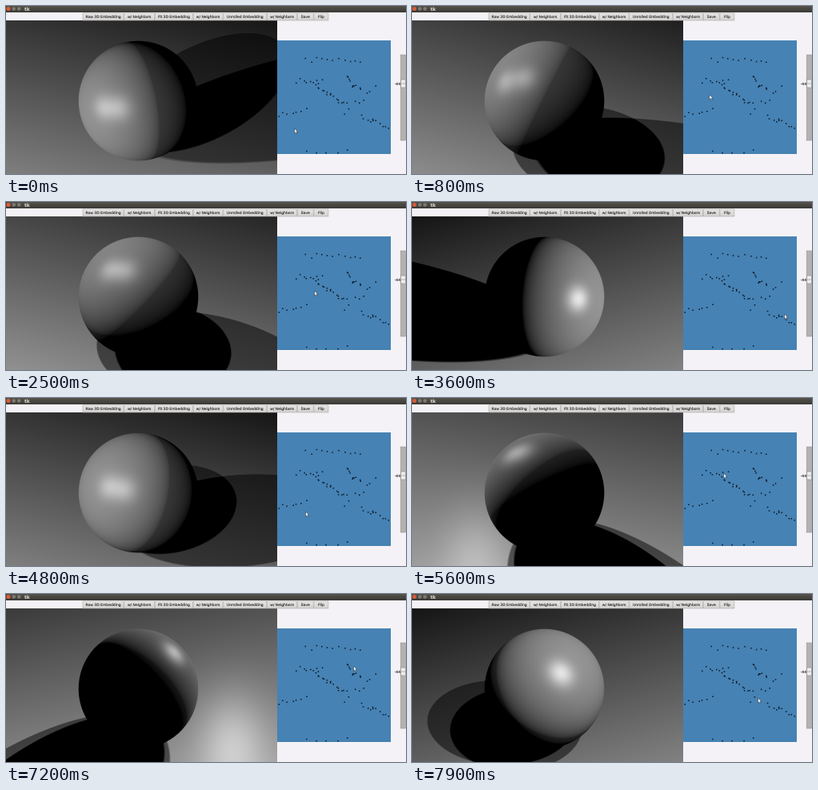
Animation of 500 by 210 pixels, one loop 8 s. Source, as an HTML page with a canvas:

```html
<!DOCTYPE html>
<html lang="en">
<head>
<meta charset="utf-8">
<title>tk</title>
<style>
  html, body { margin: 0; width: 100%; height: 100%; overflow: hidden; background: #f4f2f6; }
  #stage { position: absolute; left: 0; top: 0; width: 500px; height: 210px; overflow: hidden; }
  canvas { position: absolute; left: 0; top: 18px; }
  svg { position: absolute; left: 0; top: 0; font-family: "DejaVu Sans", sans-serif; }
</style>
</head>
<body>
<div id="stage">
  <canvas id="view" width="339" height="192"></canvas>
  <svg width="500" height="210" viewBox="0 0 500 210">
    <defs>
      <linearGradient id="bar" x2="0" y2="1"><stop stop-color="#55534c"/><stop offset="1" stop-color="#3a3934"/></linearGradient>
      <linearGradient id="btn" x2="0" y2="1"><stop stop-color="#e9e7e6"/><stop offset="1" stop-color="#d3d1d0"/></linearGradient>
    </defs>
    <rect width="500" height="8" fill="url(#bar)"/>
    <circle cx="3" cy="3.5" r="2.5" fill="#dd5a35"/>
    <circle cx="9.8" cy="3.5" r="2.3" fill="#7c7a72"/>
    <circle cx="16.2" cy="3.5" r="2.3" fill="#7c7a72"/>
    <text x="23" y="5.6" font-size="6" font-weight="bold" fill="#dfdbd2">tk</text>
    <g id="buttons"></g>
    <rect x="339" y="43" width="142" height="142" fill="#4682b4"/>
    <path id="dots" fill="#0a1520"/>
    <text x="493" y="99.4" font-size="4.5" text-anchor="end" fill="#222" stroke="#222" stroke-width=".12">-44</text>
    <rect x="493.2" y="61" width="6.3" height="107" fill="#b4b2b0" stroke="#96948f" stroke-width=".6"/>
    <rect x="493.6" y="92" width="5.8" height="10" fill="#efedec" stroke="#8a8884" stroke-width=".6"/>
    <path d="M493.8 97h5.4" stroke="#8a8884" stroke-width=".6"/>
    <path id="cursor" d="M0 0V6.2L1.4 4.9 2.4 7.2 3.4 6.8 2.4 4.6H4.3Z" fill="#fff" stroke="#16212c" stroke-width=".5"/>
  </svg>
</div>
<script>
const LOOP = 8000, STEP = 100;
const W = 339, H = 192, TOP = 18;
const CX = 165.5, CY = 118.5, R = 74.8;         // ball on screen
const FLOOR_Y = 168, TILT = .68, DEPTH = 1 / 500; // floor seen by the camera
const RISE = Math.sqrt(1 - TILT * TILT);
const MAP_X = 410, MAP_Y = 124;                 // pointer spot with the light overhead

const $ = id => document.getElementById(id);
const clamp = v => v < 0 ? 0 : v > 1 ? 1 : v;
const mix = (a, b, k) => a + (b - a) * k;
const rad = deg => deg * Math.PI / 180;

// pointer path: time, x, y
const path = [
  [0, 362, 156], [1500, 383, 78], [2800, 388, 122], [2900, 388, 122], [3600, 467, 143],
  [4800, 376, 145], [5600, 391, 97], [7200, 436, 93], [7900, 434, 133]
];

function pointerAt(t) {
  let i = 0;
  while (i < path.length - 2 && t >= path[i + 1][0]) i++;
  const [t0, x0, y0] = path[i], [t1, x1, y1] = path[i + 1];
  const k = clamp((t - t0) / (t1 - t0));
  const e = mix(k, k * k * (3 - 2 * k), .5);
  return [mix(x0, x1, e), mix(y0, y1, e)];
}

// Offset from the overhead spot -> direction and zenith angle of a light
function makeLight(dx, dy) {
  const len = Math.hypot(dx, dy) || 1;
  const ux = dx / len, uy = dy / len, back = Math.max(0, -uy);
  const zenith = 1.3 * Math.hypot(dx, dy < 0 ? dy * 1.8 : dy);
  const flat = Math.sin(rad(zenith)), up = Math.cos(rad(zenith));
  const x = flat * ux;
  const y = flat * uy * TILT - up * RISE;
  const z = flat * uy * RISE + up * TILT;
  const half = Math.hypot(x, y, z + 1) || 1;
  const cast = rad(Math.min(zenith, 80 - 24 * back));
  return {
    ux, uy, x, y, z,
    hx: x / half, hy: y / half, hz: (z + 1) / half,
    reach: R * Math.tan(cast), long: R / Math.cos(cast), wide: R * (1 + .1 * Math.tan(cast))
  };
}

function shadow(l, gx, gy) {
  const along = -gx * l.ux - gy * l.uy - l.reach;
  const across = gx * l.uy - gy * l.ux;
  return clamp(.5 + (1 - Math.hypot(along / l.long, across / l.wide)) * 55);
}

function shine(l, nx, ny, nz, body) {
  const d = nx * l.x + ny * l.y + nz * l.z;
  if (d <= 0) return 0;
  const s = Math.max(0, nx * l.hx + ny * l.hy + nz * l.hz);
  return body * Math.sqrt(d) + 95 * s ** 45 * Math.min(1, d * 6);
}

const ctx = $("view").getContext("2d");
const image = ctx.createImageData(W, H);

function render(t) {
  const [px, py] = pointerAt(t);
  $("cursor").setAttribute("transform", `translate(${px - 1.5} ${py - 3})`);
  const dx = px - MAP_X, dy = py - MAP_Y;
  const ux = dx / (Math.hypot(dx, dy) || 1);
  const back = Math.max(0, -dy) / (Math.hypot(dx, dy) || 1);

  // two lights that drift apart toward the left of the map
  const spread = .16 * Math.max(0, 467 - px) * (1 - .7 * back);
  const a = makeLight(dx - .84 * spread, dy - .54 * spread);
  const b = makeLight(dx + .84 * spread, dy + .54 * spread);

  const body = 148 - 35 * back;
  const glow = 140 * clamp((-dy - 20) / 26);
  const glowX = CX + 4.5 * dx, glowY = 290 + 3.3 * dy;
  const data = image.data;
  for (let j = 0, o = 0; j < H; j++) {
    const y = j + TOP + .5, drop = y - FLOOR_Y;
    const gy = drop / (TILT + DEPTH * drop), shrink = 1 - DEPTH * gy;
    const base = mix(38, 112, j / H) + 42 * back;
    for (let i = 0; i < W; i++, o += 4) {
      const x = i + .5;
      const nx = (x - CX) / R, ny = (y - CY) / R, r = Math.hypot(nx, ny);
      const cover = clamp((1 - r) * R + .5);
      let tone = 0;
      if (cover < 1) {
        const gx = (x - CX) * shrink;
        tone = base + 18 * ux * (x - CX) / CX;
        if (glow) tone += glow * Math.exp(-(((x - glowX) / 43) ** 2 + ((y - glowY) / 68) ** 2));
        tone *= 1 - (shadow(a, gx, gy) + shadow(b, gx, gy)) / 2;
      }
      if (cover > 0) {
        const nz = Math.sqrt(Math.max(0, 1 - r * r));
        const ball = (shine(a, nx, ny, nz, body) + shine(b, nx, ny, nz, body)) / 2;
        tone = mix(tone, ball, cover);
      }
      data[o] = data[o + 1] = data[o + 2] = tone;
      data[o + 3] = 255;
    }
  }
  ctx.putImageData(image, 0, 0);
}

function drawButtons() {
  const labels = ["Raw 3D Embedding", "w/ Neighbors", "Fit 3D Embedding", "w/ Neighbors",
    "Unrolled Embedding", "w/ Neighbors", "Save", "Flip"];
  const widths = [51, 38, 47, 37, 54, 37, 20, 18];
  let x = 96;
  $("buttons").innerHTML = labels.map((label, i) => {
    const w = widths[i], left = x;
    x += w + .7;
    return `<rect x="${left}" y="9" width="${w}" height="9" fill="url(#btn)" stroke="#aaa8a6" stroke-width=".6"/>
      <text x="${left + w / 2}" y="15" font-size="4.5" text-anchor="middle" fill="#1c1c1c" stroke="#1c1c1c" stroke-width=".1">${label}</text>`;
  }).join("");
}

// loose strands of dots: from x,y to x,y and how many
function drawDots() {
  let seed = 7;
  const random = () => (seed = seed * 16807 % 2147483647) / 2147483647;
  const strands = [
    [364, 92, 394, 95, 9], [386, 98, 424, 124, 16], [374, 66, 442, 68, 11], [424, 88, 442, 106, 10],
    [444, 135, 476, 154, 11], [341, 134, 375, 126, 7], [376, 183, 426, 183, 5], [424, 131, 460, 100, 8]
  ];
  let d = "";
  for (const [x0, y0, x1, y1, n] of strands)
    for (let i = 0; i < n; i++) {
      const k = i / (n - 1);
      const x = mix(x0, x1, k) + random() * 4 - 2, y = mix(y0, y1, k) + random() * 8 - 4;
      d += `M${Math.max(340, x).toFixed(1)} ${Math.min(183, y).toFixed(1)}h1.5v1.5h-1.5z`;
    }
  $("dots").setAttribute("d", d);
}

drawButtons();
drawDots();
const start = performance.now();
let shown = -1;
function tick() {
  const t = Math.floor(((performance.now() - start) % LOOP) / STEP) * STEP;
  if (t !== shown) render(shown = t);
  requestAnimationFrame(tick);
}
tick();
</script>
</body>
</html>
```
